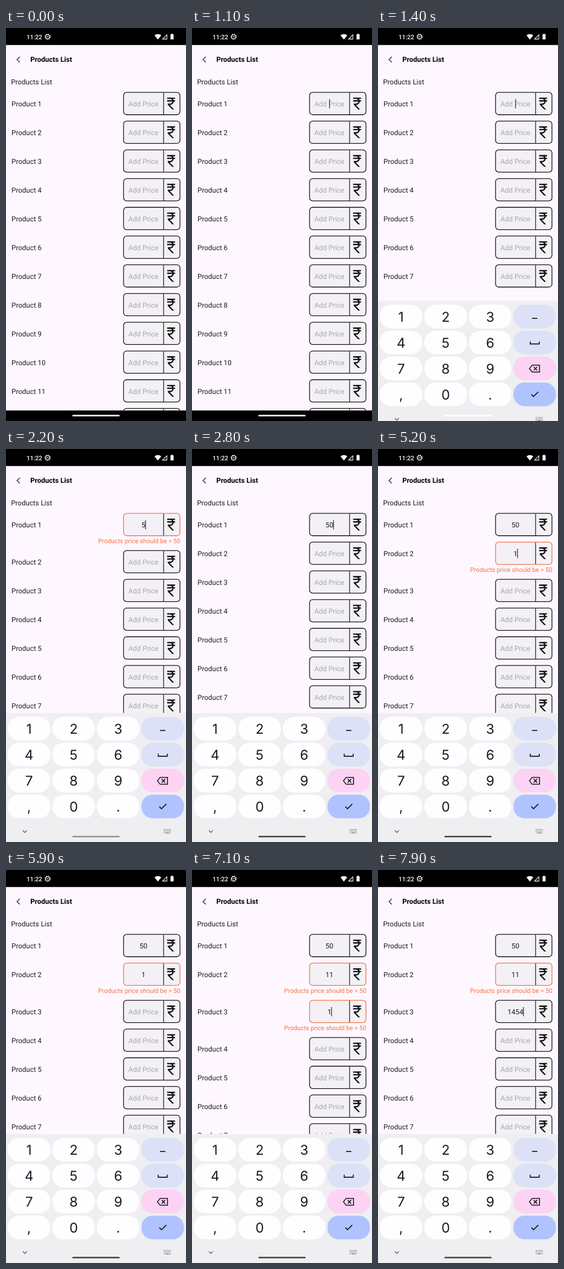
These frames come from a looping animation (320x697 px, 8000 ms). An HTML page:

```html
<!DOCTYPE html>
<html lang="en">
<head>
<meta charset="utf-8">
<title>Products List</title>
<style>
  html, body { margin: 0; width: 100%; height: 100%; overflow: hidden; background: #fef7ff; }
  svg { display: block; width: 100vw; height: 100vh; font: 12.45px Roboto, sans-serif; text-rendering: geometricPrecision; }
  .line { fill: none; stroke: #111; }
  .mid { text-anchor: middle; }
  .error { font-size: 11.1px; fill: #ef7348; text-anchor: end; }
  .digit { font: 24px Inter, sans-serif; fill: #1b1b1f; text-anchor: middle; }
</style>
</head>
<body>
<svg viewBox="0 0 320 697" xmlns="http://www.w3.org/2000/svg">
  <defs>
    <clipPath id="listClip"><rect id="listArea" y="76" width="320" height="602"/></clipPath>
    <path id="rupee" transform="translate(279.5 119.9) scale(1.167)" d="M13.66 7c-.56-1.18-1.76-2-3.16-2H6V3h12v2h-3.26c.48.58.84 1.26 1.05 2H18v2h-2.02c-.25 2.8-2.61 5-5.48 5h-.73l6.73 7h-2.77L7 14v-2h3.5c1.76 0 3.22-1.3 3.46-3H6V7Z"/>
  </defs>
  <rect width="320" height="697" fill="#fef7ff"/>

  <g id="status">
    <rect width="320" height="30.2" fill="#000"/>
    <text x="36.4" y="19.8" font-size="11" font-weight="500" fill="#fff">11:22</text>
    <g fill="none" stroke="#fff">
      <circle cx="74" cy="15.5" r="3.7" stroke-width="1.2"/>
      <circle cx="74" cy="15.5" r="4.7" stroke-width="1.3" stroke-dasharray="1.8 1.89"/>
      <path d="M72 15.5h4" stroke-width="1.2"/>
      <path d="M278.4 19.6L286 12v7.6Z" stroke-width="1.1"/>
    </g>
    <path d="M264 13q6-4.4 12 0l-6 7.4Z" fill="#fff"/>
    <path d="M292.5 11.3h1.5v-1.1h2.4v1.1h1.5v9h-5.4Z" fill="#fff"/>
  </g>

  <path class="line" d="M24.6 51l-5 5 5 5" style="stroke:#3a3d82" stroke-width="1.7"/>
  <text x="43.2" y="60.2" font-weight="700">Products List</text>
  <text x="8.9" y="100.2" fill="#1b1b1f">Products List</text>

  <g id="list" clip-path="url(#listClip)"></g>
  <rect y="678.3" width="320" height="18.7" fill="#000"/>

  <g id="keyboard">
    <rect y="468" width="320" height="229" fill="#efeef1"/>
    <g id="keys"></g>
    <g class="line" stroke-width="1.7">
      <path d="M274 499.2h9.2"/>
      <path d="M270.6 540.6v4.2h16v-4.2"/>
      <path d="M274 582.4h13.2v12.2H274l-4.8-6.1Z" stroke-width="1.5"/>
      <path d="M276.8 585.4l6.2 6.2m0-6.2l-6.2 6.2" stroke-width="1.5"/>
      <path d="M272.6 634.2l3.8 3.8 8.6-8.4"/>
      <path d="M29.8 676.4l3.7 3.6 3.7-3.6" style="stroke:#55545a" stroke-width="1.3"/>
      <g style="stroke:#66656b" stroke-width="1.4">
        <path d="M280.6 675h12.2M280.6 677.9h12.2" stroke-dasharray="1.4 1.3"/>
        <path d="M280.6 680.9h1.4m1.3 0h6.8m1.3 0h1.4"/>
      </g>
    </g>
  </g>
  <rect id="handle" x="118" y="686.1" width="84" height="2.7" rx="1.35" fill="#fff"/>
</svg>

<script>
const LOOP = 8000, ROWS = 12, PITCH = 50.96, ERROR_HEIGHT = 15;
const KEYBOARD = { start: 1200, duration: 340, height: 229 };
const BLINK = 500, CENTER = 244.2, DIGIT_WIDTH = 7;

// Each entry focuses a row and sets its value; lit is the first caret period.
const INPUTS = [
  { at: 1000, row: 0, value: '' },
  { at: 2000, row: 0, value: '5' },
  { at: 2400, row: 0, value: '50' },
  { at: 4500, row: 1, value: '' },
  { at: 5200, row: 1, value: '1' },
  { at: 6100, row: 1, value: '11' },
  { at: 6400, row: 2, value: '', lit: 400 },
  { at: 7100, row: 2, value: '1' },
  { at: 7200, row: 2, value: '14' },
  { at: 7400, row: 2, value: '145' },
  { at: 7700, row: 2, value: '1454' }
];

const byId = id => document.getElementById(id);
const clamp = v => Math.max(0, Math.min(1, v));

function add(parent, tag, attrs, text = '') {
  const el = document.createElementNS('http://www.w3.org/2000/svg', tag);
  for (const key in attrs) el.setAttribute(key, attrs[key]);
  el.textContent = text;
  parent.appendChild(el);
  return el;
}

// Row coordinates are those of the first row.
function makeRow(index) {
  const group = add(byId('list'), 'g', {});
  add(group, 'text', { x: 9.8, y: 139.2, fill: '#1b1b1f' }, `Product ${index + 1}`);
  const box = add(group, 'rect', {
    x: 209, y: 114.15, width: 100.3, height: 39.6, rx: 5.5,
    fill: '#f3f1f5', stroke: '#111', 'stroke-width': 1.3
  });
  add(group, 'path', { class: 'line', d: 'M280.2 114.8v38.3', 'stroke-width': 1.2 });
  add(group, 'use', { href: '#rupee', fill: '#111' });
  const value = add(group, 'text', { class: 'mid', x: CENTER, y: 139.2 });
  const caret = add(group, 'rect', { y: 126.1, width: 1.3, height: 16.4, fill: '#262a50' });
  const error = add(group, 'text', { class: 'error', x: 310, y: 166.6 }, 'Products price should be > 50');
  return { group, box, value, caret, error };
}

function makeKeys() {
  const faces = ['123', '456', '789', ',0.'];
  const accents = ['#dce1f8', '#dce1f8', '#fcd3f5', '#b0c3ff'];
  faces.forEach((face, r) => {
    for (let c = 0; c < 4; c++) {
      const x = 3.2 + c * 79.2, y = 475 + r * 46;
      add(byId('keys'), 'rect', {
        x, y, width: 75.6, height: 42, rx: 20, fill: c < 3 ? '#fefdff' : accents[r]
      });
      if (c < 3) add(byId('keys'), 'text', { class: 'digit', x: x + 37.8, y: y + 30.2 }, face[c]);
    }
  });
}

const rows = Array.from({ length: ROWS }, (_, i) => makeRow(i));
makeKeys();

function draw(t) {
  const done = INPUTS.filter(input => input.at <= t);
  const current = done[done.length - 1];
  const values = {};
  done.forEach(input => { values[input.row] = input.value; });

  let shift = 0;
  rows.forEach((row, i) => {
    const value = values[i] || '';
    const invalid = value !== '' && Number(value) < 50;
    row.group.setAttribute('transform', `translate(0 ${i * PITCH + shift})`);
    row.box.setAttribute('stroke', invalid ? '#ef7348' : '#111');
    row.value.textContent = value || 'Add Price';
    row.value.setAttribute('fill', value ? '#1b1b1f' : '#a9a7ac');
    row.error.setAttribute('visibility', invalid ? 'visible' : 'hidden');

    let lit = false;
    if (current && current.row === i) {
      const phase = t - current.at + BLINK - (current.lit || BLINK);
      lit = Math.floor(phase / BLINK) % 2 === 0;
    }
    row.caret.setAttribute('visibility', lit ? 'visible' : 'hidden');
    row.caret.setAttribute('x', CENTER - 0.3 + value.length * DIGIT_WIDTH / 2);
    if (invalid) shift += ERROR_HEIGHT;
  });

  const left = Math.pow(1 - clamp((t - KEYBOARD.start) / KEYBOARD.duration), 3);
  byId('keyboard').setAttribute('transform', `translate(0 ${left * KEYBOARD.height})`);
  byId('listArea').setAttribute('height', t < KEYBOARD.start ? 602 : 392);

  const tone = Math.round(255 - 179 * clamp((t - 1800) / 700));
  byId('handle').setAttribute('fill', `rgb(${tone},${tone},${tone})`);
}

const begin = performance.now();
function tick() {
  draw((performance.now() - begin) % LOOP);
  requestAnimationFrame(tick);
}
tick();
</script>
</body>
</html>
```
